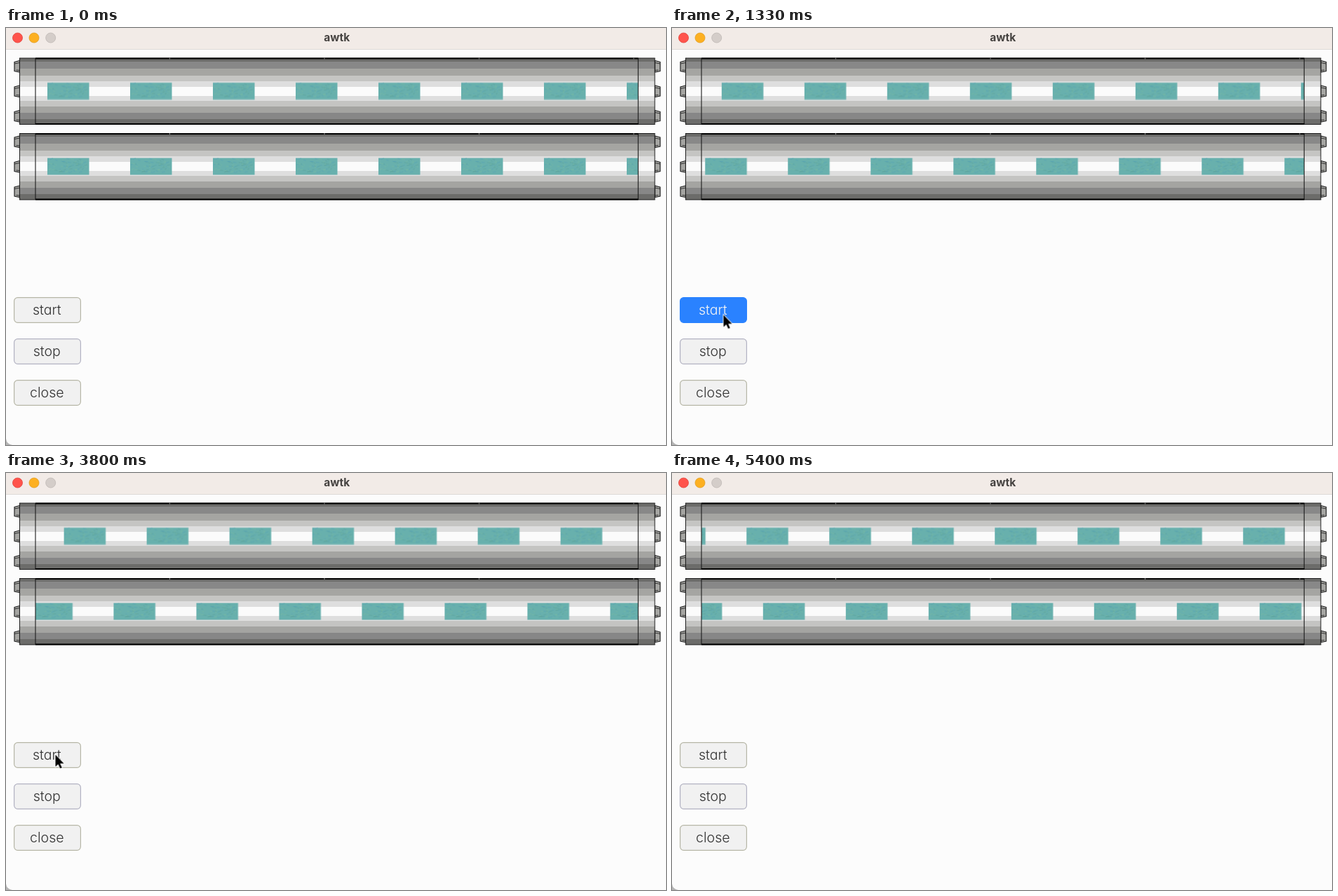
An HTML page that plays this animation: 941x595 px, repeating every 5470 ms.

```html
<!DOCTYPE html>
<html lang="en">
<head>
<meta charset="utf-8">
<title>awtk</title>
<style>
  html, body { margin: 0; width: 100%; height: 100%; overflow: hidden; background: #fcfcfc; }
  svg { display: block; width: 941px; height: 595px; }
  text { text-anchor: middle; font-family: Inter, "Open Sans", sans-serif; }
  .title { font-size: 15.5px; font-weight: 700; fill: #464341; }
  .label { font-size: 19.6px; font-weight: 300; font-feature-settings: "cv11"; fill: #333; }
</style>
</head>
<body>
<svg viewBox="0 0 941 595">
  <defs>
    <clipPath id="window"><rect x="42.5" y="0" width="858.5" height="96"/></clipPath>
    <g id="block"></g>
    <g id="screw" stroke="#222" stroke-width="1.2">
      <path d="M12 -6.5L19.5 -8.5V8L12 6.5Z" fill="#a5a5a2"/>
      <path d="M12 -4L19.5 -5.5M14.5 5L19.5 5.5" fill="none" stroke-width=".9"/>
    </g>
    <g id="screws">
      <use href="#screw" y="12.5"/><use href="#screw" y="48"/><use href="#screw" y="83.5"/>
    </g>
  </defs>

  <rect width="941" height="595" fill="#fcfcfc"/>
  <rect width="941" height="31" fill="#f2ebe7"/>
  <rect y="30" width="941" height="1" fill="#dedad7"/>
  <g stroke-width=".8">
    <circle cx="16.5" cy="14" r="7" fill="#ff544c" stroke="#e2453d"/>
    <circle cx="40" cy="14" r="7" fill="#fdb021" stroke="#e09c20"/>
    <circle cx="63.7" cy="14" r="7" fill="#d4cdc9" stroke="#bfb9b5"/>
  </g>
  <text class="title" x="471.8" y="19">awtk</text>
  <path d="M0 586Q1 594 9 595H0Z" fill="#b4b4b4"/>

  <g id="belts"></g>
  <g id="buttons"></g>
  <path id="cursor" d="M0 0V17L3.9 13.4L6.7 19.6L9.3 18.4L6.6 12.4H12Z"
        fill="#000" stroke="#fff" stroke-width="1.6" paint-order="stroke"/>
</svg>

<script>
const LOOP = 5470, FRAMES = 82, PITCH = 118;
const $ = id => document.getElementById(id);

function add(parent, tag, attrs, text) {
  const el = document.createElementNS('http://www.w3.org/2000/svg', tag);
  for (const name in attrs) el.setAttribute(name, attrs[name]);
  if (text) el.textContent = text;
  return parent.appendChild(el);
}

// Plays pose(k) as held steps at 15 per second, on a 10 ms grid.
function play(el, pose) {
  const keys = [];
  for (let k = 0; k <= FRAMES; k++) {
    const at = Math.round(k * 20 / 3) * 10;
    keys.push({ ...pose(Math.min(k, FRAMES - 1)), offset: Math.min(1, at / LOOP), easing: 'step-end' });
  }
  el.animate(keys, { duration: LOOP, iterations: Infinity });
}

// Textured block
let seed = 11;
const rand = () => (seed = seed * 16807 % 2147483647) / 2147483647;
const block = $('block');
add(block, 'rect', { width: 59.5, height: 24, fill: '#68b0ad' });
for (let i = 0; i < 70; i++) {
  const x = 1 + rand() * 52, y = 1 + rand() * 20;
  add(block, 'path', {
    d: `M${x.toFixed(1)} ${y.toFixed(1)}l${(2 + rand() * 3).toFixed(1)} ${(rand() * 4 - 2).toFixed(1)}`,
    stroke: ['#5aa5b4', '#76b9a5', '#5fa59f'][i % 3], 'stroke-width': 1.5, opacity: .5
  });
}

// Belts: [lower edge, colour] from top to bottom
const BANDS = [
  [5, '#6c6c6a'], [15, '#888888'], [25, '#a5a5a2'], [33, '#c5c5c3'], [41, '#dedede'], [54, '#fbfbfb'],
  [61, '#dedede'], [69, '#c4c4c2'], [78, '#a4a4a1'], [87, '#878787'], [95, '#6c6c6a']
];

// Tenths of a pitch travelled: runs, stops, then runs again.
function travel(k) {
  if (k < 7) return 2 * k;
  return k < 47 ? Math.min(2 * k - 1, 58) : 58 + 2 * (k - 47);
}

function belt(y, dir) {
  const g = add($('belts'), 'g', { transform: `translate(0 ${y})` });
  add(g, 'use', { href: '#screws' });
  add(g, 'use', { href: '#screws', transform: 'translate(944.7 0) scale(-1 1)' });
  let top = 0;
  for (const [bottom, fill] of BANDS) {
    add(g, 'rect', { x: 19.5, y: top, width: 905.5, height: bottom - top, fill, 'shape-rendering': 'crispEdges' });
    top = bottom;
  }
  const row = add(add(g, 'g', { 'clip-path': 'url(#window)' }), 'g', {});
  for (let i = -1; i < 8; i++) add(row, 'use', { href: '#block', x: i * PITCH, y: 35.5 });
  add(g, 'rect', { x: 19.5, y: .5, width: 905.5, height: 94.5, fill: 'none', stroke: '#1c1c1c' });
  add(g, 'path', { d: 'M42 .5V95M901.3 .5V95', stroke: '#1c1c1c', 'stroke-width': 1.1 });
  add(g, 'path', { d: 'M42 1H901.5M42 94.5H901.5', stroke: '#000', 'stroke-width': 2 });
  add(g, 'path', { d: 'M233.5 0v2m220.5 -2v2m220.5 -2v2m220.5 -2v2', stroke: '#888' });
  play(row, k => {
    const n = (((5 + dir * travel(k)) % 10) + 10) % 10;
    return { transform: `translateX(${(n * PITCH / 10).toFixed(1)}px)` };
  });
}
belt(42.5, -1);
belt(150, 1);

// Buttons: presses are [first, last] steps
function button(label, y, line, presses) {
  const box = add($('buttons'), 'rect', { x: 11.6, y, width: 94.8, height: 35.6, rx: 5, fill: '#f1f1f1', stroke: line, 'stroke-width': 1.2 });
  const text = add($('buttons'), 'text', { class: 'label', x: 58.3, y: y + 24.3 }, label);
  if (!presses.length) return;
  const down = k => presses.some(([a, b]) => k >= a && k <= b);
  play(box, k => down(k) ? { fill: '#2a82ff', stroke: '#2a82ff' } : { fill: '#f1f1f1', stroke: line });
  play(text, k => ({ fill: down(k) ? '#f4f4f4' : '#333333' }));
}
button('start', 384.7, '#b6b6a6', [[19, 21], [45, 46]]);
button('stop', 443.7, '#b2b2c2', [[28, 29]]);
button('close', 502.7, '#b6b6a6', []);

// Pointer stops: [step, x, y]
const PATH = [
  [9, 190, 595], [13, 121, 450], [18, 73.5, 409.5], [22, 73.5, 409.5],
  [26, 71, 455], [36, 71, 455], [41, 70.5, 402], [72, 70.5, 402]
];
play($('cursor'), k => {
  const shown = k > 9 && k <= 72;
  const i = Math.max(1, PATH.findIndex(p => p[0] >= k));
  const [a, b] = [PATH[i - 1], PATH[i]];
  const u = Math.max(0, (k - a[0]) / (b[0] - a[0])), s = shown ? u * u * (3 - 2 * u) : 0;
  const mix = j => (a[j] + (b[j] - a[j]) * s).toFixed(1);
  return { transform: `translate(${mix(1)}px, ${mix(2)}px)`, opacity: shown ? 1 : 0 };
});
</script>
</body>
</html>
```
